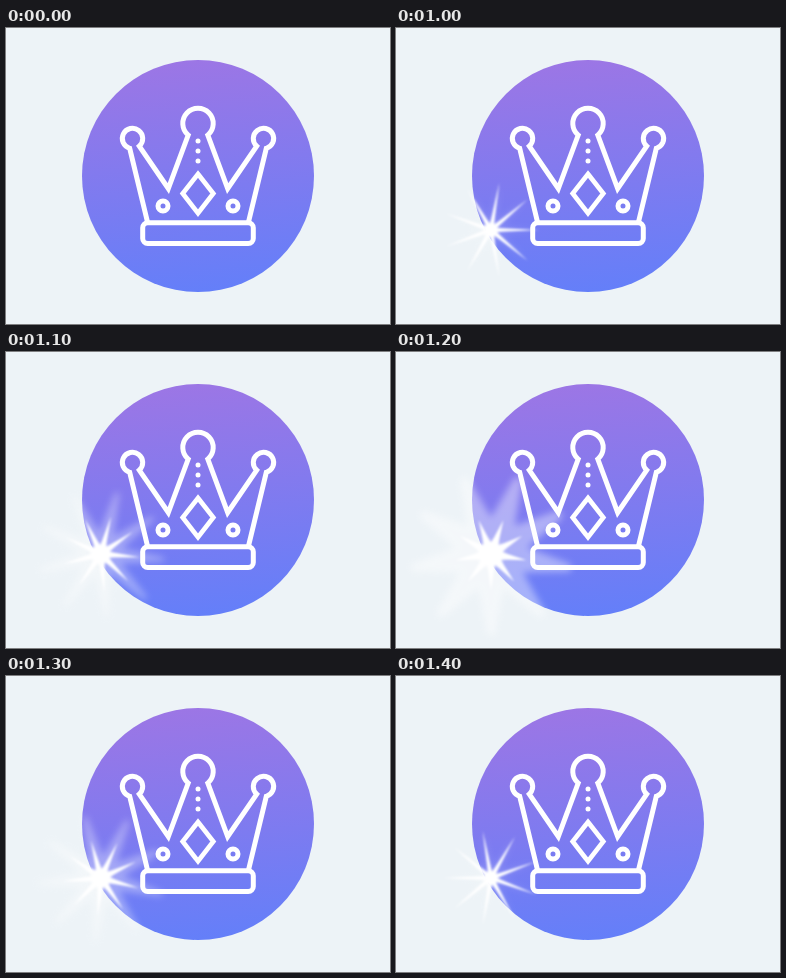
Write an HTML page that moves like this. It is 384 px wide and 296 px high and loops after 1500 ms.

```html
<!DOCTYPE html>
<html lang="en">
<head>
<meta charset="utf-8">
<title>Sparkling crown</title>
<style>
  html, body { margin: 0; width: 100%; height: 100%; overflow: hidden; background: #edf3f7; }
  svg { display: block; width: 100vw; height: 100vh; }
</style>
</head>
<body>
<svg viewBox="0 0 384 296">
  <defs>
    <linearGradient id="sky" gradientUnits="userSpaceOnUse" x1="182" y1="32" x2="202" y2="264">
      <stop offset="0" stop-color="#9c76e5"/>
      <stop offset="1" stop-color="#647ff9"/>
    </linearGradient>
    <filter id="soft" x="-50%" y="-50%" width="200%" height="200%"><feGaussianBlur stdDeviation=".8"/></filter>
    <filter id="haze" x="-50%" y="-50%" width="200%" height="200%"><feGaussianBlur stdDeviation="3.5"/></filter>
    <filter id="bloom" x="-100%" y="-100%" width="300%" height="300%"><feGaussianBlur stdDeviation="2.5"/></filter>
  </defs>

  <rect width="384" height="296" fill="#edf3f7"/>
  <circle cx="192" cy="148" r="116" fill="url(#sky)"/>

  <g fill="none" stroke="#fff" stroke-width="5">
    <path d="M141.5 194L123.7 120.3A10.2 10.2 0 1 1 133.3 118.1L162.3 160.5L182.2 107.1A15.2 15.2 0 1 1 201.8 107.1L221.7 160.5L250.7 118.1A10.2 10.2 0 1 1 260.3 120.3L242.5 194"/>
    <path d="M192 146L207.3 165.5L192 185.2L176.7 165.5Z" stroke-width="4.7"/>
    <circle cx="157" cy="178" r="5"/>
    <circle cx="227" cy="178" r="5"/>
    <rect x="136.7" y="194.8" width="110.6" height="20.7" rx="5"/>
  </g>
  <g fill="#fff">
    <circle cx="192" cy="113" r="2.5"/>
    <circle cx="192" cy="123" r="2.5"/>
    <circle cx="192" cy="133" r="2.5"/>
  </g>

  <g id="spark" fill="#fff" transform="translate(95 202)" visibility="hidden">
    <path id="halo" filter="url(#haze)" stroke="#fff" stroke-linejoin="round"/>
    <path id="rays" filter="url(#soft)"/>
    <circle id="core" filter="url(#bloom)"/>
  </g>
</svg>
<script>
  const LOOP = 1500, START = 1000, STEP = 100, STEPS = 5, POINTS = 9;
  const [spark, halo, rays, core] = ["spark", "halo", "rays", "core"].map(id => document.getElementById(id));

  function star(outer, inner, turn) {
    const corners = [];
    for (let i = 0; i < POINTS * 2; i++) {
      const angle = turn * Math.PI / 180 + i * Math.PI / POINTS;
      const radius = i % 2 ? inner : outer;
      corners.push((radius * Math.cos(angle)).toFixed(2) + " " + (radius * Math.sin(angle)).toFixed(2));
    }
    return "M" + corners.join("L") + "Z";
  }

  function draw(time) {
    const step = Math.floor((time % LOOP - START) / STEP);
    const lit = step >= 0 && step < STEPS;
    spark.setAttribute("visibility", lit ? "visible" : "hidden");
    if (!lit) return;

    // The flash swells to its middle step and shrinks back while turning.
    const swell = 1 - Math.abs(step - 2) / 2;
    const turn = step * 5;
    rays.setAttribute("d", star(48 - 26 * swell + 14 * swell * swell, 6 + 5 * swell, turn));
    halo.setAttribute("d", star(46 + 31 * swell, 6 + 22 * swell, turn));
    halo.setAttribute("stroke-width", 9 * swell);
    halo.setAttribute("opacity", 0.25 + 0.15 * swell);
    core.setAttribute("r", 6 + 6 * swell);
  }

  function tick() {
    draw(performance.now());
    requestAnimationFrame(tick);
  }
  tick();
</script>
</body>
</html>
```
